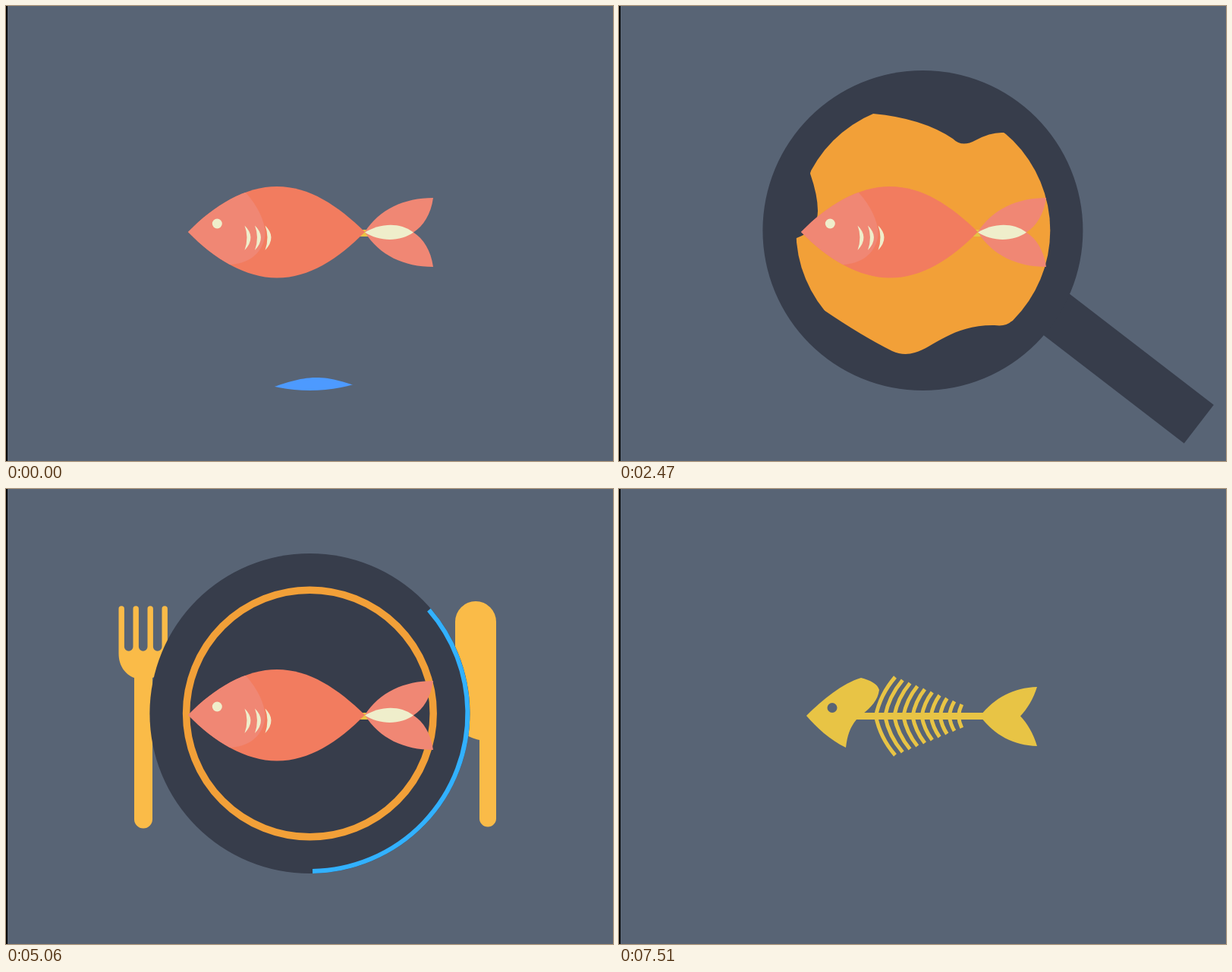
An HTML page with a canvas for the animation above (7580 ms loop, 800 by 600 pixels).

```html
<!DOCTYPE html>
<html lang="en">
<head>
<meta charset="utf-8">
<title>Fish</title>
<style>
html, body { margin: 0; width: 100%; height: 100%; overflow: hidden; background: #586475; }
canvas { display: block; width: 800px; height: 600px; }
</style>
</head>
<body>
<canvas id="stage" width="800" height="600"></canvas>
<script>
const ctx = document.getElementById('stage').getContext('2d');
const LOOP = 7580, CX = 400.4, CY = 296, R = 211, RAD = Math.PI / 180;
const BG = '#586475', DARK = '#373d4b', CORAL = '#f27c5f', PINK = '#f08774', CREAM = '#efeecb',
      OIL = '#f2a038', WATER = '#4d9aff', ARC = '#32b1ff', STEEL = '#fabb48', BONE = '#e8c445';

// Tables of time, value
const T = {
  fishY: [[0, 0], [220, -9], [400, -14], [620, 2], [820, 15], [900, 8], [1190, -125], [1400, -85], [1620, 0]],
  fishTurn: [[860, 0], [1190, 90], [1400, 180], [1620, 270], [1910, 360]],
  fill: [[0, 530], [820, 377.5], [1240, 285], [1620, 160], [1910, 60]],
  drain: [[6320, 60], [6740, 290], [7020, 535]],
  coral: [[7020, 60], [7510, 535]],
  blob: [[2120, 0], [2470, 1], [2610, 1.45]],
  handle: [[2120, 190], [2400, 449], [2470, 444.4], [3870, 444.4], [4220, 262], [4290, 262], [4430, 190]],
  turn: [[3450, 37.6], [3520, 42], [3870, 80], [4220, 150], [4290, 174], [4430, 220]],
  arc: [[3520, 0], [3870, 85], [4220, 230], [4570, 360], [4850, 360], [5060, 130], [5200, 0]],
  hole: [[4220, 0], [4570, 158]],
  ring: [[6250, 360], [6600, 0]],
  cutlery: [[4850, -100], [5060, 0], [5200, 45], [6250, 45], [6390, 0], [6600, -100]]
};

// Bites: x, y, radius, start
const bites = [
  [378, 291, 40, 5340], [432, 302, 46, 5550], [335, 262, 44, 5620], [345, 335, 44, 5690],
  [392, 246, 42, 5760], [395, 350, 46, 5830], [472, 298, 40, 5900], [305, 300, 46, 5970],
  [540, 268, 46, 6040], [530, 325, 46, 6110]
];

const body = new Path2D('M240 298C275 262 316 238 357 238C400 238 437 263 473 298C437 334 400 358.5 357 358.5C316 358.5 275 334 240 298Z');
const face = new Path2D('M316 246C334 266 344 290 341 306C336 328 318 340 295 341L230 341V240Z');
const lobes = new Path2D('M473 298C492 268 525 253 563 253C560 275 550 290 537 298.5C550 307 560 322 563 344C525 344 492 329 473 298Z');
const lens = new Path2D('M473 298.5C492 287 518 284 537 298.5C520 311 492 311 473 298.5Z');
const skull = new Path2D('M247 299C268 278 295 256 319 249C331 252 341 257 343 265C341 279 332 288 322 296L313 304C304 315 301 325 299 341C278 331 260 314 247 299ZM287.5 288.5a6.5 6.5 0 1 0 -13 0a6.5 6.5 0 1 0 13 0Z');
const fin = new Path2D('M476 299.5C495 275 520 262 551 261C546 277 538 290 529 299.5C538 309 546 322 551 339C520 338 495 325 476 299.5Z');
const blob = new Path2D('M335 142Q400 148 440 175Q452 187 470 177Q490 166 507 167L620 220L600 400L517 416Q510 423 495 421C440 420 415 450 390 457Q375 462 360 455Q320 435 270 401L180 400V330L234 306Q262 296 262 270Q262 250 252 221L270 120Z');
const fork = new Path2D('M148.5 158' +
  ('a3.7 3.7 0 0 1 7.4 0' + 'V208a5.8 5.8 0 0 0 11.6 0V158').repeat(3) +
  'a3.7 3.7 0 0 1 7.4 0V217C213 234 204 245 193 249V435.5a12 12 0 0 1 -24 0V249C158 245 148.5 234 148.5 217Z');
const knife = new Path2D('M592 175a27 27 0 0 1 54 0V434.5a11 11 0 0 1 -22 0V331C607 327 592 318 592 300Z');

function at(table, t) {
  if (t <= table[0][0]) return table[0][1];
  for (let i = 1; i < table.length; i++) {
    const [t0, a] = table[i - 1], [t1, b] = table[i];
    if (t < t1) return a + (b - a) * (t - t0) / (t1 - t0);
  }
  return table[table.length - 1][1];
}

// Time advances in small holds
function hold(t) {
  const snap = (from, step) => from + step * Math.floor((t - from) / step + 1e-6);
  if (t < 70) return 0;
  return t < 820 ? snap(70, 75) : t < 1700 ? snap(820, 80) : snap(1700, 70);
}

function fill(path, color, rule) {
  ctx.fillStyle = color;
  ctx.fill(path, rule || 'nonzero');
}

function disc(x, y, r, color) {
  ctx.fillStyle = color;
  ctx.beginPath();
  ctx.arc(x, y, r, 0, 7);
  ctx.fill();
}

function clipped(x, y, r, draw) {
  ctx.save();
  ctx.beginPath();
  ctx.arc(x, y, r, 0, 7);
  ctx.clip();
  draw();
  ctx.restore();
}

function wave(level, amp, period, crest, color) {
  if (level > 525) return;
  clipped(CX, CY, R, () => {
    ctx.beginPath();
    ctx.moveTo(180, 600);
    for (let x = 180; x <= 620; x += 4)
      ctx.lineTo(x, level - amp * Math.cos((x - crest) / period * 2 * Math.PI));
    ctx.lineTo(620, 600);
    ctx.fillStyle = color;
    ctx.fill();
  });
}

function arcLine(r, width, from, sweep, color) {
  if (sweep <= 0) return;
  ctx.beginPath();
  ctx.arc(CX, CY, r, from * RAD, (from - sweep) * RAD, true);
  ctx.lineWidth = width;
  ctx.strokeStyle = color;
  ctx.stroke();
}

function drawCutlery(t) {
  const out = at(T.cutlery, t);
  if (out <= -100) return;
  [[fork, -1], [knife, 1]].forEach(([path, side]) => {
    ctx.save();
    ctx.translate(side * out, 0);
    fill(path, STEEL);
    ctx.restore();
  });
}

function drawHandle(t) {
  const len = at(T.handle, t), turn = at(T.turn, t);
  if (len <= 195) return;
  const shift = -20 - 5 * Math.min(1, (turn - 37.6) / 42.4);
  ctx.save();
  ctx.translate(400, 296);
  ctx.rotate(turn * RAD);
  ctx.fillStyle = DARK;
  ctx.fillRect(0, shift - 32, len, 64);
  ctx.restore();
}

function drawDish(t) {
  if (t < 1910) {
    const level = at(T.fill, t), drift = (t - 820) * 0.15;
    wave(level - 29.5, 10.5, 204, 286 - drift, WATER);
    wave(level, 13.5, 250, 275 + drift, DARK);
  } else if (t < 6320) {
    disc(CX, CY, R, DARK);
  } else {
    const crest = 483 + (t - 6740) * 0.15;
    wave(at(T.coral, t), 16, 164, crest, CORAL);
    wave(at(T.drain, t), 16, 164, crest, DARK);
  }
}

function drawOil(t) {
  if (t < 2190 || t >= 6600) return;
  if (t >= 4570) return arcLine(162.8, 9.5, 90, at(T.ring, t), OIL);
  const s = at(T.blob, t);
  clipped(CX + 0.4, CY, 167.5, () => {
    ctx.translate(400, 296);
    ctx.scale(s, s);
    ctx.translate(-400, -296);
    if (t < 2610) fill(blob, OIL);
    else disc(400, 296, 200, OIL);
  });
  const r = at(T.hole, t);
  if (r > 0) disc(CX + 0.4, CY, r, DARK);
}

function drawSteam(t) {
  if (t < 2750 || t >= 3520) return;
  ctx.save();
  ctx.strokeStyle = CREAM;
  ctx.globalAlpha = 0.6;
  ctx.lineWidth = 7;
  ctx.lineCap = 'round';
  [300, 401, 502].forEach((x, i) => {
    const head = 222 - (t - 2700 - (i % 2 ? 0 : 70)) * 0.42;
    const top = Math.max(18, head), low = Math.min(221, head + 85);
    if (top >= low) return;
    ctx.beginPath();
    for (let y = top; y <= low; y += 3) ctx.lineTo(x + 11 * Math.sin(y / 13), y);
    ctx.stroke();
  });
  ctx.restore();
}

function drawBones() {
  ctx.strokeStyle = BONE;
  ctx.lineWidth = 5;
  for (let i = 0; i < 10; i++) {
    const tip = 364 + i * 9.75, base = 338.5 + i * 12.1, h = 51.5 - i * 4;
    for (const side of [-1, 1]) {
      ctx.beginPath();
      ctx.moveTo(tip, 299.5 + side * h);
      ctx.quadraticCurveTo(base + (tip - base) * 0.22, 299.5 + side * h * 0.55, base, 299.5);
      ctx.stroke();
    }
  }
  ctx.fillStyle = BONE;
  ctx.fillRect(311, 295, 170, 9);
  fill(skull, BONE, 'evenodd');
  fill(fin, BONE);
}

function drawFlesh(t) {
  if (t >= 6180) return;
  ctx.save();
  for (const [x, y, r, start] of bites) {
    if (t < start) continue;
    const cut = new Path2D();
    cut.rect(0, 0, 800, 600);
    cut.arc(x, y, t < start + 70 ? r * 0.6 : r, 0, 7);
    ctx.clip(cut, 'evenodd');
  }
  fill(lobes, PINK);
  fill(lens, CREAM);
  fill(body, CORAL);
  ctx.save();
  ctx.clip(body);
  fill(face, PINK);
  ctx.restore();
  disc(278.3, 287, 6.5, CREAM);
  for (const x of [314.5, 328, 341.5])
    fill(new Path2D(`M${x} 289.5Q${x + 16} 305 ${x} 322Q${x + 6} 305 ${x} 289.5Z`), CREAM);
  ctx.restore();
}

function drawFish(t) {
  ctx.save();
  ctx.translate(401.5, 298.5 + at(T.fishY, t));
  ctx.rotate(at(T.fishTurn, t) * RAD);
  ctx.translate(-401.5, -298.5);
  drawBones();
  drawFlesh(t);
  ctx.restore();
}

function draw(t) {
  ctx.fillStyle = BG;
  ctx.fillRect(0, 0, 800, 600);
  drawCutlery(t);
  drawHandle(t);
  drawDish(t);
  drawOil(t);
  arcLine(208, 6, 89, at(T.arc, t), ARC);
  drawFish(t);
  drawSteam(t);
  ctx.fillStyle = '#000';
  ctx.fillRect(0, 0, 2, 600);
}

const begin = performance.now();
function tick() {
  draw(hold((performance.now() - begin) % LOOP));
  requestAnimationFrame(tick);
}
tick();
</script>
</body>
</html>
```
